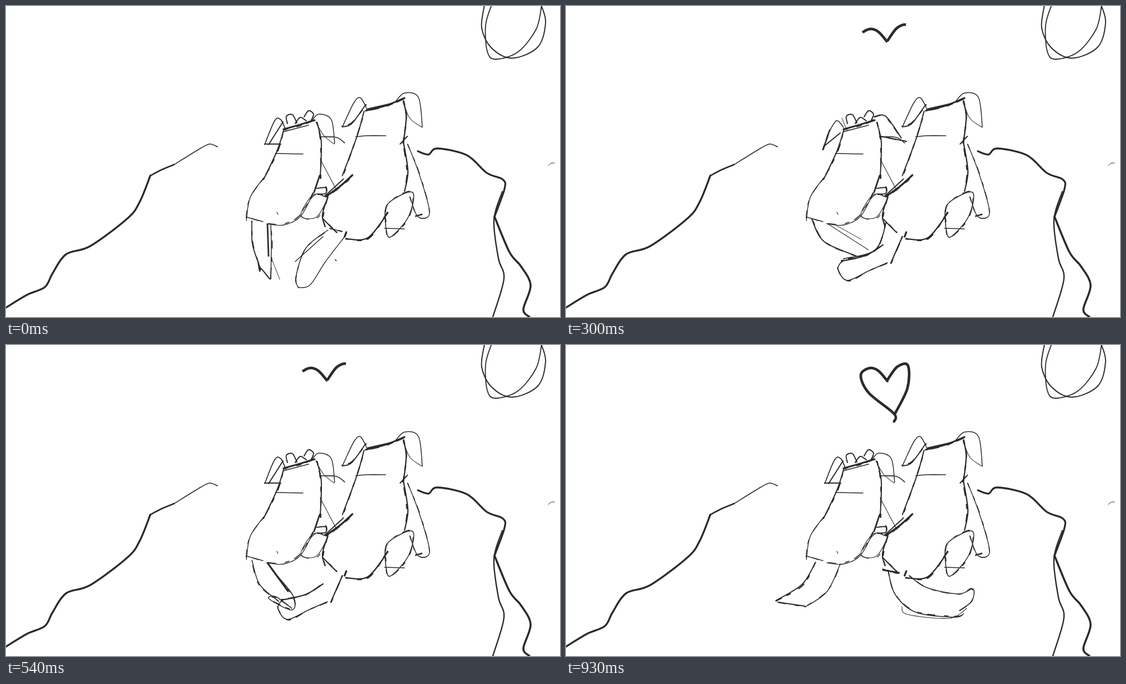
An HTML page for the animation above (1.08 s loop, 998x561 px).

```html
<!DOCTYPE html>
<html lang="en">
<head>
<meta charset="utf-8">
<title>Two friends on a hill</title>
<style>
html, body { margin: 0; width: 100%; height: 100%; overflow: hidden; background: #fff; }
svg { display: block; width: 100vw; height: 100vh; }
path { fill: none; stroke: #2b2b2b; stroke-linecap: round; stroke-linejoin: round; }
</style>
</head>
<body>
<svg id="stage" viewBox="0 0 998 561"></svg>
<script>
const stage = document.getElementById('stage');
const LOOP = 1080;
const poses = {};
let layer = stage;
let seed = 7;

function random() {
  seed = (seed * 16807) % 2147483647;
  return seed / 2147483647;
}

function add(parent, tag, attrs = {}) {
  const el = document.createElementNS('http://www.w3.org/2000/svg', tag);
  for (const key in attrs) el.setAttribute(key, attrs[key]);
  return parent.appendChild(el);
}

// Following strokes belong to this pose of a moving part
function pose(part, name) {
  layer = add(stage, 'g');
  (poses[part] ??= {})[name] = layer;
}

// Smooth curve through x, y pairs; shake moves the inner points
function spline(n, shake = 0) {
  const p = [];
  for (let i = 0; i < n.length; i += 2) {
    const inner = i > 0 && i < n.length - 2 ? 1 : 0.5;
    p.push([n[i], n[i + 1]].map(v => v + (random() - 0.5) * shake * inner));
  }
  const at = i => p[Math.max(0, Math.min(p.length - 1, i))];
  let d = `M${p[0]}`;
  for (let i = 0; i < p.length - 1; i++) {
    const [a, b, c, e] = [at(i - 1), at(i), at(i + 1), at(i + 2)];
    const c1 = b.map((v, k) => v + (c[k] - a[k]) / 6);
    const c2 = c.map((v, k) => v - (e[k] - b[k]) / 6);
    d += `C${c1} ${c2} ${c}`;
  }
  return d;
}

function line(width, ...points) {
  return add(layer, 'path', { d: spline(points), 'stroke-width': width });
}

// Pencil look: one whole stroke and a broken one next to it
function rough(width, ...points) {
  line(width, ...points);
  add(layer, 'path', {
    d: spline(points, 4), 'stroke-width': width * 1.15,
    'stroke-dasharray': '13 17 7 11', 'stroke-dashoffset': random() * 48
  });
}

// Landscape
line(3.4, 0, 544, 38, 521, 70, 507, 84, 482, 108, 448, 152, 433, 219, 383, 241, 353, 260, 306);
line(2.6, 260, 306, 281, 295, 303, 286);
line(1.6, 303, 286, 350, 257, 367, 249, 381, 254);
line(3.3, 742, 262, 761, 268, 777, 257, 830, 269, 866, 301, 895, 313, 898, 330, 880, 380);
line(3.6, 880, 380, 907, 444, 928, 470, 945, 504, 932, 547, 943, 561);
line(2.4, 894, 335, 879, 386, 887, 455, 897, 492, 877, 561);
line(1, 977, 288, 981, 284, 988, 283);
line(2, 862, -2, 857, 40, 875, 76, 912, 94, 958, 74, 972, 30, 964, -2);
line(1.8, 874, 0, 864, 35, 867, 82, 882, 96, 922, 83, 955, 42, 965, -2);

// Small friend
line(2, 507, 212, 505, 199, 516, 196, 524, 211);
line(2, 521, 212, 530, 201, 541, 207);
line(2, 537, 200, 545, 189, 554, 195, 550, 206);
rough(3, 501, 222, 530, 214, 556, 206);
line(1.8, 499, 227, 545, 215);
rough(2, 501, 222, 488, 262, 464, 313);
rough(2, 560, 210, 568, 246, 566, 310);
line(1.6, 565, 236, 595, 237, 610, 247);
line(1.7, 486, 266, 535, 267);
rough(1.4, 466, 308, 440, 345, 433, 387);
rough(1.3, 434, 381, 463, 389);
rough(1.4, 470, 393, 500, 395, 530, 380, 554, 337);
line(2.8, 565, 306, 555, 336);
line(1.1, 566, 276, 596, 333);
rough(2, 560, 329, 576, 328, 576, 338, 562, 340);
rough(1.2, 578, 345, 553, 341, 531, 378, 559, 381, 578, 350);
line(1.1, 488, 372, 490, 376);

// Tall friend
rough(2, 645, 190, 632, 236, 606, 306);
rough(3, 648, 189, 683, 180, 718, 166);
line(3, 652, 186, 696, 176);
line(1.5, 702, 172, 718, 157, 743, 165, 750, 218);
line(1.1, 750, 219, 728, 203, 715, 173);
line(1.5, 651, 188, 639, 166, 627, 174, 606, 218);
rough(2, 606, 218, 623, 212, 648, 178);
line(1.6, 630, 236, 650, 234, 684, 234);
rough(2.3, 716, 172, 721, 200, 716, 247);
line(2, 723, 235, 710, 249);
rough(3.4, 577, 343, 602, 325, 624, 305);
line(2, 574, 343, 608, 312);
rough(2, 580, 344, 570, 377, 575, 398);
rough(2.2, 716, 246, 724, 298, 718, 334);
rough(1.4, 724, 250, 745, 305, 763, 373, 742, 380, 728, 345);
line(2.8, 738, 379, 749, 376);
rough(1.6, 684, 398, 687, 358, 732, 336, 725, 380, 692, 417, 684, 398);
line(1.3, 682, 401, 718, 402);
rough(2.1, 570, 383, 595, 408);
rough(2.3, 612, 420, 652, 418, 688, 373);
line(3.4, 613, 408, 610, 416);

// Tail of the small friend
pose('tail', 'down');
rough(1.8, 443, 388, 444, 430, 459, 475);
line(2.2, 454, 461, 457, 478, 460, 474, 475, 492, 477, 487);
rough(1.5, 477, 395, 478, 430, 477, 491);
line(2.8, 471, 394, 473, 451);
line(1, 479, 457, 493, 493);

pose('tail', 'right');
rough(1.5, 443, 388, 457, 432, 491, 462);
line(3.2, 471, 393, 508, 444);
rough(1.6, 480, 407, 517, 452, 515, 478, 474, 458, 486, 454, 515, 475);

pose('tail', 'far');
rough(2, 443, 385, 465, 425, 523, 451);
rough(1.9, 500, 456, 557, 440, 577, 390);
line(1.1, 470, 392, 545, 440);
line(1, 487, 396, 532, 421);

pose('tail', 'left');
rough(1.5, 453, 391, 445, 444, 430, 508);
rough(1.7, 490, 397, 484, 446, 432, 507);

pose('tail', 'up');
rough(1.8, 449, 393, 425, 432, 378, 461);
rough(1.5, 494, 395, 470, 445, 430, 473);
rough(1.9, 382, 464, 430, 471);

// Tail of the tall friend
pose('brush', 'down');
rough(1.5, 580, 404, 540, 437, 522, 490, 527, 508);
line(1.5, 521, 461, 571, 416);
line(1.4, 526, 508, 548, 503, 575, 462, 611, 415);
line(1.8, 593, 458, 595, 459);
rough(1.5, 583, 401, 605, 407);

pose('brush', 'left');
rough(2.2, 497, 460, 540, 450, 571, 431);
rough(1.6, 497, 460, 490, 475, 507, 495, 545, 478, 579, 463);
rough(2.1, 606, 416, 585, 464);

pose('brush', 'far');
rough(2.5, 482, 434, 540, 422, 582, 404);
line(1.5, 482, 434, 476, 447, 485, 455);
rough(2, 604, 406, 587, 431);
rough(1.3, 600, 407, 568, 444, 515, 461);
line(1.8, 593, 458, 595, 459);

pose('brush', 'right');
rough(1.6, 577, 402, 580, 455, 611, 494, 660, 515);
rough(1.4, 608, 419, 636, 466, 677, 486, 661, 489);
line(1.1, 678, 487, 678, 503, 660, 516, 687, 498);
line(1, 612, 422, 640, 459);
rough(3, 572, 406, 600, 411);

pose('brush', 'up');
rough(1.6, 580, 406, 593, 450, 630, 482, 700, 491, 716, 485);
line(1.1, 605, 472, 615, 486, 690, 493, 722, 475);
rough(1.6, 618, 416, 651, 438, 707, 449, 733, 440, 731, 462, 709, 479);
rough(3, 572, 406, 600, 411);

// Ears of the small friend
pose('ears', 'rest');
line(1.7, 504, 224, 495, 205, 484, 207, 466, 250);
line(2, 499, 209, 473, 250);
line(2, 466, 249, 495, 249);
line(1.5, 553, 204, 564, 195, 586, 205, 592, 248);
line(1.1, 558, 209, 572, 233, 591, 249);

pose('ears', 'wide');
line(1.5, 500, 219, 487, 207, 471, 233);
rough(2.5, 475, 224, 463, 259);
line(2, 494, 229, 466, 252);
line(1, 497, 202, 506, 225);
rough(2, 556, 200, 576, 199, 604, 238);
rough(1.8, 566, 235, 613, 244);

pose('ears', 'tucked');
line(1.4, 504, 223, 489, 206, 482, 212, 470, 262);
rough(1.6, 463, 264, 492, 249);
line(1.4, 468, 242, 482, 264);
line(1.7, 555, 202, 575, 193, 595, 225, 578, 260);
line(1.4, 558, 208, 575, 256);
line(2.5, 579, 257, 590, 239);

// Heart, grown from the middle down both sides
pose('sky', 'heart');
const halves = [
  line(4.7, 579, 65, 562, 46, 545, 42, 531, 55, 545, 86, 591, 124, 591, 138),
  line(4.7, 579, 63, 597, 39, 616, 37, 615, 78, 592, 125)
];

// Start time of each pose in ms
const tracks = {
  tail: { 0: 'down', 150: 'right', 240: 'far', 450: 'right', 690: 'down', 810: 'left', 930: 'up' },
  brush: { 0: 'down', 180: 'left', 390: 'far', 540: 'left', 600: 'down', 750: 'right', 900: 'up' },
  ears: { 0: 'rest', 240: 'wide', 450: 'tucked', 540: 'rest' },
  sky: { 0: 'none', 300: 'heart' }
};

function render(ms) {
  const t = ms % LOOP;
  for (const part in tracks) {
    const [, now] = Object.entries(tracks[part]).filter(([start]) => start <= t).pop();
    for (const name in poses[part])
      poses[part][name].style.display = name === now ? '' : 'none';
  }
  const grown = t < 600 ? 0.32 : t < 750 ? 0.77 : 1;
  for (const half of halves) {
    const length = half.getTotalLength();
    half.style.strokeDasharray = grown < 1 ? `${length * grown} ${length}` : 'none';
    half.style.strokeLinecap = grown < 1 ? 'butt' : 'round';
  }
}

const begin = performance.now();
function tick() {
  render(performance.now() - begin);
  requestAnimationFrame(tick);
}
tick();
</script>
</body>
</html>
```
